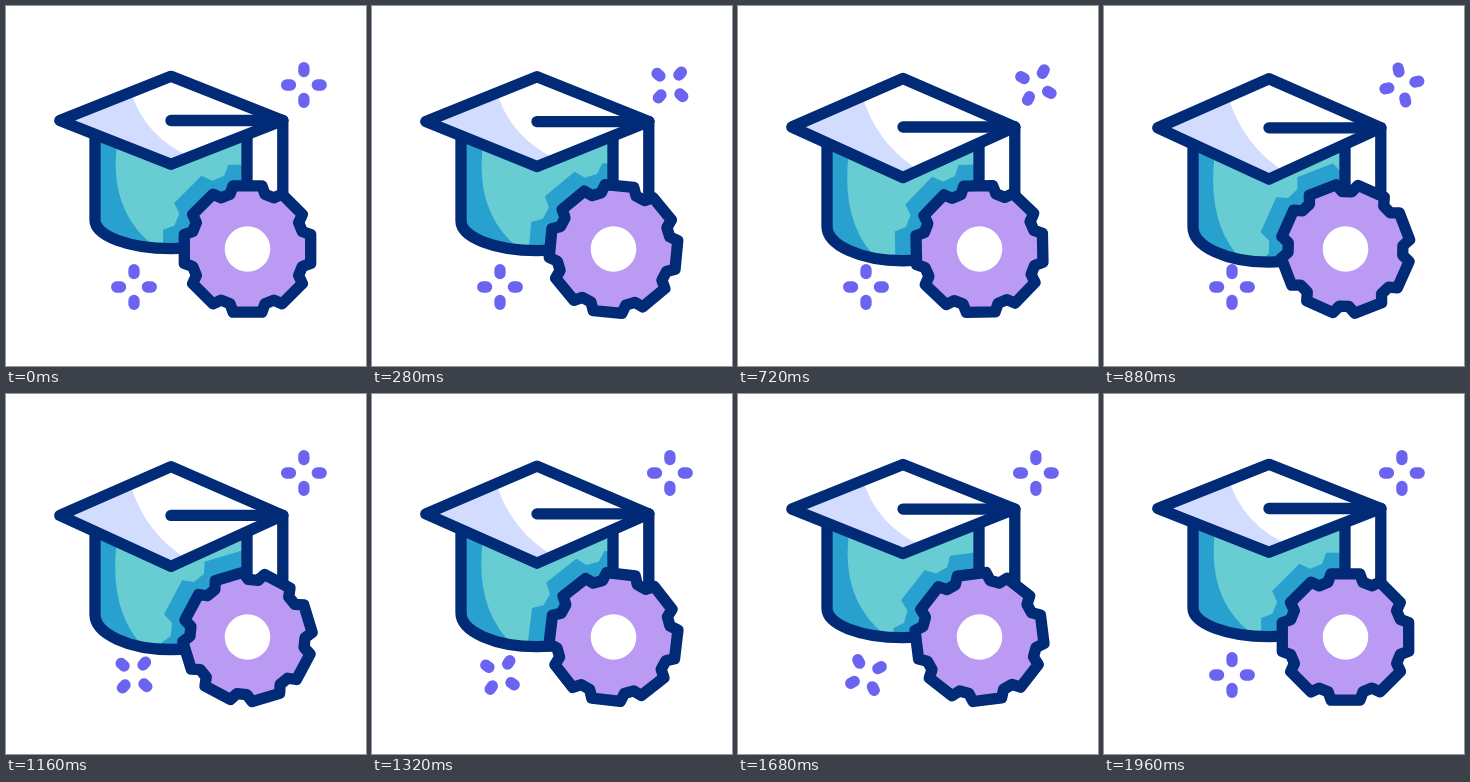
Animation, 360 px wide and 360 px high, one loop 2000 ms. Source, as an HTML page with a canvas:

```html
<!DOCTYPE html>
<html lang="en">
<head>
<meta charset="utf-8">
<title>Graduation cap and gear</title>
<style>
html, body { margin: 0; width: 100%; height: 100%; overflow: hidden; background: #fff; }
canvas { display: block; width: 360px; height: 360px; }
</style>
</head>
<body>
<canvas id="stage" width="360" height="360"></canvas>
<script>
const ctx = document.getElementById('stage').getContext('2d');
const LOOP = 2000;
const NAVY = '#012a77', LAVENDER = '#d2dcff', TEAL = '#67cdd2', BLUE = '#28a1cf',
      PURPLE = '#bb9af3', VIOLET = '#6a64f1';

// Cubic bezier (.5, 0, .5, 1), solved by bisection
function ease(x) {
  if (x <= 0) return 0;
  if (x >= 1) return 1;
  let lo = 0, hi = 1, s = .5;
  for (let i = 0; i < 20; i++) {
    s = (lo + hi) / 2;
    if (1.5 * s * (1 - s) + s ** 3 < x) lo = s; else hi = s;
  }
  return s * s * (3 - 2 * s);
}
const span = (t, from, to) => ease((t - from) / (to - from));

function fill(path, color) {
  ctx.fillStyle = color;
  ctx.fill(path);
}
function stroke(path, color = NAVY) {
  ctx.strokeStyle = color;
  ctx.stroke(path);
}
function clipped(path, draw) {
  ctx.save();
  ctx.clip(path);
  draw();
  ctx.restore();
}
function turned(x, y, angle, scale, draw) {
  ctx.save();
  ctx.translate(x, y);
  ctx.rotate(angle);
  ctx.scale(scale, scale);
  draw();
  ctx.restore();
}

function makeGear() {
  const path = new Path2D();
  for (let i = 0; i < 8; i++) {
    const c = Math.cos(i * Math.PI / 4), s = Math.sin(i * Math.PI / 4);
    for (const [x, y] of [[-17.5, -54.8], [-14.4, -63.2], [14.4, -63.2], [17.5, -54.8]])
      path.lineTo(x * c - y * s, x * s + y * c);
  }
  path.closePath();
  return path;
}
const gear = makeGear();
const petals = new Path2D('M0-17.3V-13.4M0 17.3V13.4M-17.3 0H-13.4M17.3 0H13.4');

function sparkle(x, y, turn) {
  turned(x, y, turn * 2 * Math.PI, 1, () => stroke(petals, VIOLET));
}

function cap(k, spin) {
  const mix = (a, b) => a + (b - a) * k;
  const mid = mix(114.5, 121.9), top = mix(70.3, 72.8), tip = mix(158.3, 173.3);
  const side = mix(214, 221), base = mix(242.6, 256.4);

  const body = new Path2D(`M89 ${mid}V${side}A76 ${base - side} 0 0 0 241 ${side}V${mid}Z`);
  fill(body, BLUE);
  clipped(body, () => {
    fill(new Path2D(`M112 ${mix(130, 140)}Q100 ${mix(203, 216)} ${mix(148, 138)} ${mix(240, 255)}
      V270H250V100H112Z`), TEAL);
    turned(241.5, 243, spin, 1.335, () => fill(gear, BLUE));
  });
  stroke(body);
  stroke(new Path2D(`M276.8 ${mid}V200`));

  const board = new Path2D(`M165 ${top}L276.8 ${mid}L165 ${tip}L53.8 ${mid}Z`);
  fill(board, '#fff');
  clipped(board, () => fill(new Path2D(`M${mix(124, 123)} ${mix(82, 86)}
    Q137 ${mix(132, 140)} ${mix(191, 185)} ${mix(154, 169)}L165 190L30 ${mid}Z`), LAVENDER));
  stroke(board);
  stroke(new Path2D(`M165 ${mid}H276.8`));
}

function draw(t) {
  const spin = Math.PI * ease(t / LOOP);
  ctx.fillStyle = '#fff';
  ctx.fillRect(0, 0, 360, 360);
  ctx.lineWidth = 11.3;
  ctx.lineCap = ctx.lineJoin = 'round';

  sparkle(297.9, 79, span(t, 15, 1035));
  sparkle(128, 281, span(t, 900, 1900));
  cap(span(t, 0, 980) - span(t, 980, 1880), spin);

  turned(241.5, 243, spin, 1, () => {
    fill(gear, PURPLE);
    stroke(gear);
  });
  const hole = new Path2D();
  hole.arc(241.5, 243, 22.8, 0, 7);
  fill(hole, '#fff');
}

const start = performance.now();
function frame() {
  draw((performance.now() - start) % LOOP);
  requestAnimationFrame(frame);
}
frame();
</script>
</body>
</html>
```
